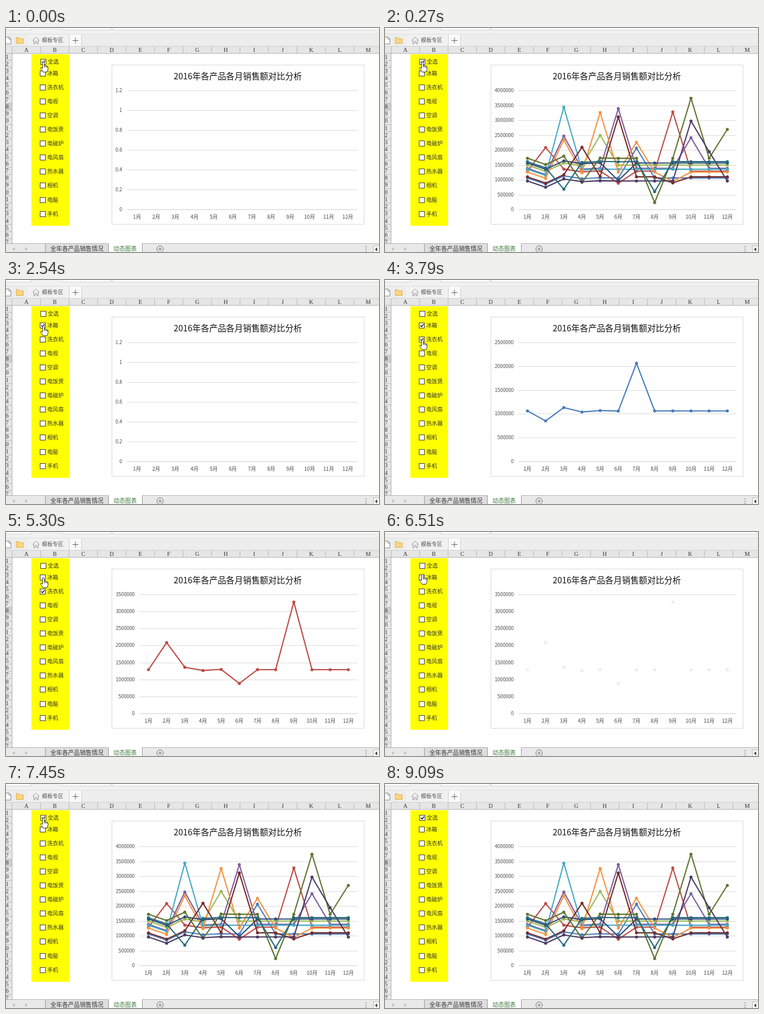
These frames come from a looping animation (639 by 384 pixels, 9.65 s). An HTML page:

```html
<!DOCTYPE html>
<html lang="zh">
<head>
<meta charset="utf-8">
<title>动态图表</title>
<style>
html, body { margin: 0; width: 100%; height: 100%; overflow: hidden; background: #fff; }
svg { display: block; width: 639px; height: 384px; }
text { font-family: "Noto Sans CJK SC", "Noto Sans CJK", "Noto Sans", sans-serif; }
.head text { font-family: "Liberation Serif", "Noto Serif", serif; }
.mid { text-anchor: middle; }
.end { text-anchor: end; }
.title { text-anchor: middle; font-weight: 300; }
</style>
</head>
<body>
<svg viewBox="0 0 639 384">
  <g id="sheet"></g>
  <g id="chart"></g>
  <g id="boxes"></g>
  <g id="cursor"></g>
</svg>
<script>
const LOOP = 9650;
const OPTIONS = ['全选', '冰箱', '洗衣机', '电视', '空调', '电饭煲', '电磁炉', '电风扇', '热水器', '相机', '电脑', '手机'];

// Sales in millions: a base level that settles after a weak February, plus unusual months.
const drift = m => m ? -.21 * (-1 / 3) ** (m - 1) : 0;
const product = (color, base, odd) => ({
  color,
  values: Array.from({ length: 12 }, (_, m) => odd[m + 1] ?? base + drift(m))
});
const SERIES = [
  product('#4a7ebb', 1.067, { 7: 2.07 }),
  product('#be4b48', 1.295, { 2: 2.09, 6: .89, 9: 3.285 }),
  product('#98b954', 1.5, { 5: 2.5 }),
  product('#7d60a0', 1.39, { 3: 2.48, 6: 3.4, 10: 2.42 }),
  product('#46aac5', 1.36, { 3: 3.45 }),
  product('#f79240', 1.265, { 3: 2.35, 5: 3.27, 7: 2.27, 9: .95 }),
  product('#2c4d75', 1.57, { 6: .98 }),
  product('#772c2a', 1.105, { 4: 2.1, 6: 3.12, 9: .9 }),
  product('#5f7530', 1.73, { 4: .92, 8: .24, 10: 3.75, 12: 2.7 }),
  product('#4d3b62', .965, { 10: 2.98, 11: 1.95 }),
  product('#276a7c', 1.615, { 3: .69, 8: .61 })
];

// Each click toggles one option; the rest of the timing follows from it.
const CLICKS = [[-10, 0], [1595, 0], [2530, 1], [3790, 2], [5030, 1], [6370, 2], [7180, 0]]
  .map(([time, option]) => ({ time, option }));
const PRESS = 150, FADE = 130, DONE = 265;
const MOVE_LEAD = 780, MOVE_TIME = 350;
const EXIT = { start: 7900, end: 9050, x: 600, y: 378 };

let ticked = [];
for (const click of CLICKS) {
  click.before = ticked;
  ticked = ticked.includes(click.option) ? ticked.filter(o => o !== click.option) : [...ticked, click.option];
  click.after = ticked;
}

const clamp = u => Math.min(1, Math.max(0, u));
const mix = (a, b, u) => a + (b - a) * u;
const easeOut = u => 1 - (1 - u) ** 3;
const easeInOut = u => u * u * (3 - 2 * u);
const lastClick = t => CLICKS.findLast(c => c.time <= t);
const seriesOf = options => options.includes(0) ? SERIES : SERIES.filter((_, i) => options.includes(i + 1));
const boxTop = i => i ? Math.round(49 + i * 24.05) + .5 : 53.5;

const rect = (x, y, w, h, fill, stroke = 'none') =>
  `<rect x="${x}" y="${y}" width="${w}" height="${h}" fill="${fill}" stroke="${stroke}"/>`;
const path = (d, stroke, fill = 'none', width = 1) =>
  `<path d="${d}" stroke="${stroke}" fill="${fill}" stroke-width="${width}" stroke-linejoin="round"/>`;
const line = (x1, y1, x2, y2, stroke) => path(`M${x1} ${y1}L${x2} ${y2}`, stroke);
const text = (x, y, size, str, cls = '', fill = '#333') =>
  `<text x="${x}" y="${y}" font-size="${size}" class="${cls}" fill="${fill}">${str}</text>`;

function topBar() {
  let s = rect(0, 0, 639, 31, '#f1f1f1');
  for (const [x, w] of [[-1, 44.5], [95.5, 84], [182.5, 460]]) s += rect(x, -1, w, 4.5, '#fff', '#d4d4d4');
  s += rect(0, 10, 639, 21, '#ededed') + line(0, 10.5, 639, 10.5, '#e0e0e0');
  s += rect(37, 11, 71, 20, '#f1f1f1') + rect(109, 11, 20, 20, '#fafafa');
  s += line(108.5, 12, 108.5, 31, '#d0d0d0') + line(129.5, 12, 129.5, 31, '#d0d0d0');
  s += path('M-1 15.5H5L8.5 19V27.5H-1M5 15.5V19H8.5', '#888', '#fff');
  s += path('M17.5 26.5V16.5H22L23.5 18.5H29.5V26.5Z', '#e3b04c', '#fcd581');
  s += path('M45.5 21.5L51.5 15.5L57.5 21.5M47.5 20V27H50V23H53V27H55.5V20', '#999');
  return s + text(61.5, 24.4, 9.2, '模板专区', '', '#555') + path('M114 21.5H124M119 16.5V26.5', '#666');
}

function headers() {
  let s = rect(0, 31, 639, 12, '#e6e6e6') + rect(0, 43, 10, 326, '#e6e6e6') + rect(0, 129, 10, 12, '#cdcdcd');
  s += line(0, 31.5, 639, 31.5, '#cfcfcf') + line(0, 43.5, 639, 43.5, '#b5b5b5');
  [...'ABCDEFGHIJKLM'].forEach((c, i) => {
    const x = 10.5 + i * 48.8;
    s += line(x, 32, x, 43, '#b9b9b9') + text(x + 24.3, 41, 10, c, 'mid');
  });
  for (let i = 0; i < 27; i++) {
    const y = 43.5 + i * 12.22;
    s += line(0, y + 12, 10, y + 12, '#bdbdbd') + text(-.5, y + 9, 10, (i + 1) % 10);
  }
  return `<g class="head">${s}${line(10.5, 43, 10.5, 369, '#b5b5b5')}</g>`;
}

function bottomBar() {
  let s = rect(0, 369, 639, 15, '#e9e9e9') + line(0, 369.5, 639, 369.5, '#b5b5b5');
  s += path('M15 376L11 379L15 382Z', 'none', '#bbb') + path('M33 376L37 379L33 382Z', 'none', '#bbb');
  s += rect(68, 370, 107, 14, '#dedede') + rect(176, 369, 57, 15, '#fff');
  for (const x of [67.5, 175.5, 233.5]) s += line(x, 370, x, 384, '#999');
  s += text(76, 382, 10.1, '全年各产品销售情况') + text(184, 382, 10, '动态图表', '', '#3a7a3a');
  s += path('M258.5 379a5.5 5.5 0 1 0 11 0a5.5 5.5 0 1 0 -11 0M261 379H267M264 376V382', '#777');
  for (let y = 375; y < 384; y += 4) s += rect(616, y - .5, 1.5, 1.5, '#777');
  return s + rect(629.5, 373.5, 12, 12, '#fff', '#bbb') + path('M636 376L632 379.5L636 383Z', 'none', '#444');
}

const sheet = () => topBar() + headers() + bottomBar() +
  rect(43.5, 45, 64.5, 294, '#ff0') + rect(181.5, 63.5, 432, 273, '#fff', '#dadada');

function chart(t) {
  const { time, before, after } = lastClick(t);
  const old = t < time + DONE ? seriesOf(before) : seriesOf(after);
  const next = t < time + FADE ? old : seriesOf(after);
  const used = [...new Set([...old, ...next])];
  const solid = used.filter(p => old.includes(p) && next.includes(p));
  const faint = used.filter(p => !solid.includes(p));
  const fading = faint.length && !solid.length;

  const empty = !used.length;
  const step = empty ? .2 : .5;
  const peak = Math.max(0, ...used.flatMap(p => p.values));
  const count = empty ? 6 : Math.ceil(peak * 1.05 / step);
  const left = empty ? 208 : 228.5, slot = (602 - left) / 12;
  const px = m => left + slot * (m + .5);
  const py = v => 311.5 - v / (count * step) * 204;

  let s = text(397.2, 88.3, 14.45, '2016年各产品各月销售额对比分析', 'title', '#111');
  for (let i = 0; i <= count; i++) {
    const y = Math.round(py(i * step) - .5) + .5;
    if (!fading || i % count === 0) s += line(left, y, 602, y, i ? '#dcdcdc' : '#d0d0d0');
    s += text(empty ? 199 : 220.5, y + 2.6, 8.4, empty ? +(i * step).toFixed(1) : i * step * 1e6, 'end', '#444');
  }
  for (let m = 0; m < 12; m++) s += text(px(m), 327, 8.8, `${m + 1}月`, 'mid', '#444');

  const dots = p => p.values.map((v, m) =>
    `<circle cx="${px(m)}" cy="${py(v)}" r="2.6" fill="${p.color}"/>`).join('');
  for (const p of faint) s += `<g opacity=".12">${dots(p)}</g>`;
  for (const p of solid) {
    s += path('M' + p.values.map((v, m) => `${px(m)} ${py(v)}`).join('L'), p.color, 'none', 2.1) + dots(p);
  }
  return s;
}

function boxes(t) {
  const { after } = lastClick(t);
  const pressed = CLICKS.find(c => t < c.time && t >= c.time - PRESS)?.option;
  return OPTIONS.map((name, i) => {
    const x = i ? 58.5 : 59.5, y = boxTop(i);
    const tick = after.includes(i) ? path(`M${x + 2} ${y + 4.3}l2 2.3l3.6-4.4`, '#111', 'none', 1.5) : '';
    return rect(x, y, 9, 9, i === pressed ? '#d0d0d0' : '#fff', '#444') + tick + text(x + 12.3, y + 7.5, 9.3, name);
  }).join('');
}

const HAND = path('M-1.5 1Q0-1 1.5 1V6.5Q3 5.5 4 7Q5.5 6 6.3 7.6Q8 7.2 8 9V12.5Q7.5 15 6.3 17.5H-.5Q-2.3 14.5-4.6 11.5Q-5 9.5-3 10L-1.5 11.3ZM1.5 6.5V9.5M4 7V9.8M6.3 7.6V10', '#222', '#fff', .9);
const ARROW = path('M0 0V11.5L2.7 9L4.6 13L6.3 12.2L4.5 8.3H8Z', '#222', '#fff', .8);

function cursor(t) {
  if (t >= EXIT.end) return '';
  const tip = c => boxTop(c.option) + 4.5;
  let x = 64, y = tip(CLICKS[0]);
  for (const c of CLICKS) y = mix(y, tip(c), easeOut(clamp((t - c.time + MOVE_LEAD) / MOVE_TIME)));
  const out = easeInOut(clamp((t - EXIT.start) / (EXIT.end - EXIT.start)));
  x = mix(x, EXIT.x, out);
  y = mix(y, EXIT.y, out);
  return `<g transform="translate(${x} ${y})">${out ? ARROW : HAND}</g>`;
}

const layers = Object.entries({ chart, boxes, cursor })
  .map(([id, render]) => ({ node: document.getElementById(id), render }));

function update(t) {
  for (const layer of layers) {
    const markup = layer.render(t);
    if (markup !== layer.markup) layer.node.innerHTML = layer.markup = markup;
  }
}

document.getElementById('sheet').innerHTML = sheet();
const start = performance.now();
(function tick() {
  update((performance.now() - start) % LOOP);
  requestAnimationFrame(tick);
})();
</script>
</body>
</html>
```
